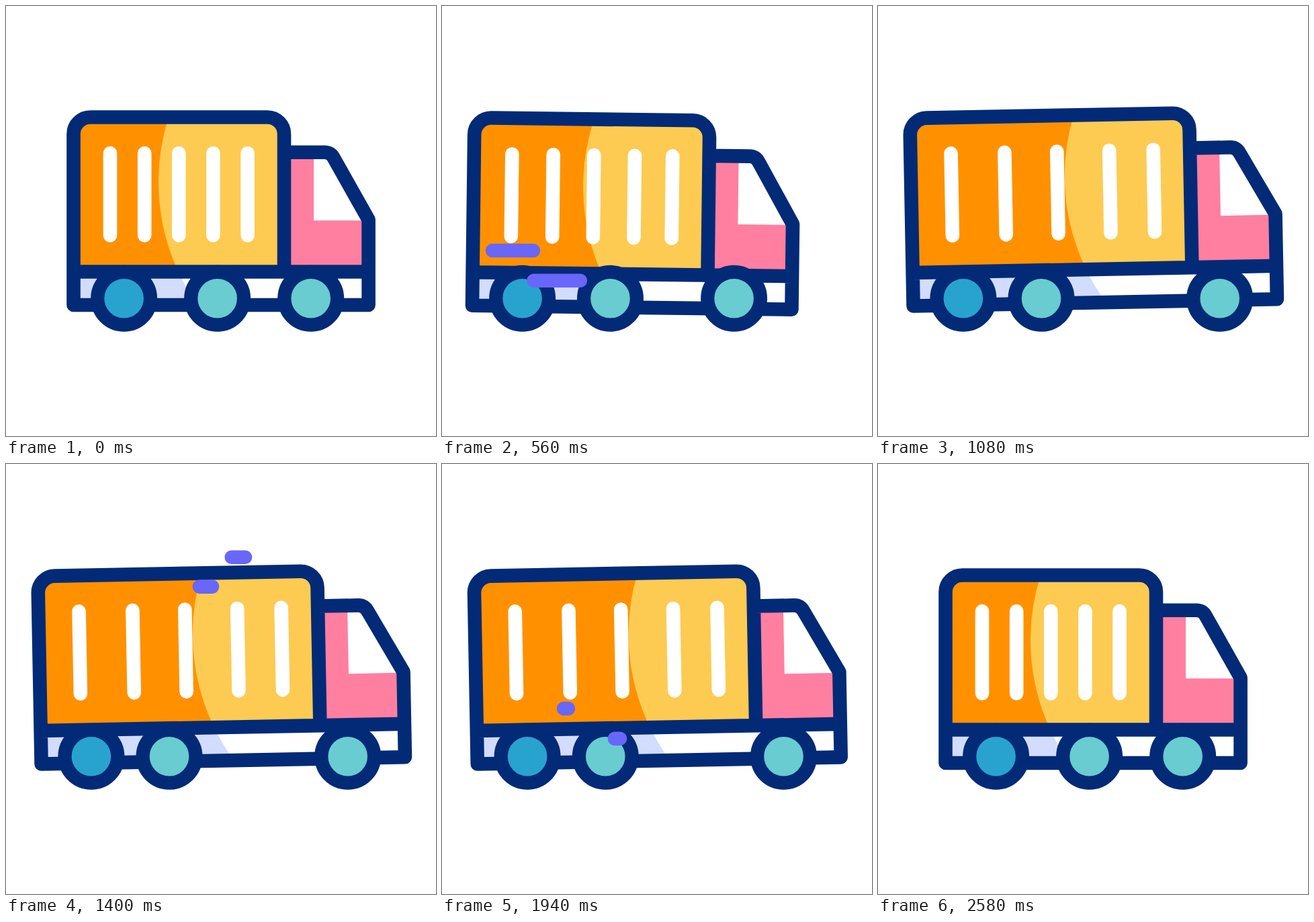
Write an HTML page that moves like this. It is 640x640 px and loops after 3 s.

```html
<!DOCTYPE html>
<html lang="en">
<head>
<meta charset="utf-8">
<title>Delivery truck</title>
<style>
  html, body { margin: 0; width: 100%; height: 100%; overflow: hidden; background: #fff; }
  svg { display: block; width: 100vw; height: 100vh; }
  .line { fill: none; stroke: #032a76; stroke-width: 20.6; stroke-linejoin: round; stroke-linecap: butt; }
  .slot { stroke: #fff; stroke-width: 20.6; stroke-linecap: round; }
  .dash { stroke: #6966fa; stroke-width: 20.6; stroke-linecap: round; }
  .wheel { stroke: #032a76; stroke-width: 20.2; }
</style>
</head>
<body>
<svg viewBox="0 0 640 640">
  <g id="body">
    <path id="load" fill="#fdcb52"/>
    <path id="shade" fill="#ff9100"/>
    <path id="base" fill="#fff"/>
    <path id="baseShade" fill="#d2dcfd"/>
    <g id="cab">
      <path fill="#ff7fa1" d="M414 218H474L488 226.500L539.600 318V395H414Z"/>
      <path fill="#fff" d="M458 218H474Q483.500 218 488 226.500L539.600 319.300H458Z"/>
    </g>
    <g id="slots"></g>
    <path id="outline" class="line"/>
  </g>
  <g id="wheels"></g>
  <g id="dashes"></g>
</svg>
<script>
  const LOOP = 3000;
  const get = id => document.getElementById(id);
  const set = (el, attrs) => { for (const k in attrs) el.setAttribute(k, attrs[k]); };
  const add = (parent, tag, attrs) => {
    const el = document.createElementNS('http://www.w3.org/2000/svg', tag);
    set(el, attrs);
    return parent.appendChild(el);
  };
  const ease = (t, from, to) => {
    const x = Math.min(1, Math.max(0, (t - from) / (to - from)));
    return x * x * (3 - 2 * x);
  };

  // Each pose: body x, body y, tilt, stretch, then the shift of each wheel
  const REST = [0, 0, 0, 0, 0, 0, 0];
  const BACK = [-60, 0, 1.7, 0, -60, -60, -60];
  const AHEAD = [-47.7, 1.7, -1.08, 102.3, -48.7, -71.6, 55];
  const mix = (a, b, k) => a.map((v, i) => v + (b[i] - v) * k);

  function poseAt(t) {
    if (t < 400) return mix(REST, BACK, ease(t, 0, 340));
    if (t < 1900) return mix(BACK, AHEAD, ease(t, 400, 800));
    return mix(AHEAD, REST, ease(t, 1920, 2520));
  }

  const slots = [[155, .056], [206.2, .336], [257.3, .598], [308.4, .86], [359.6, 1]].map(([x, k]) =>
    ({ x, k, el: add(get('slots'), 'line', { class: 'slot', y1: 219, y2: 341.5 }) }));

  const wheels = [[175.6, '#28a3cf'], [314.6, '#68ccd1'], [453.7, '#68ccd1']].map(([x, fill]) =>
    ({ x, el: add(get('wheels'), 'circle', { class: 'wheel', cy: 435.3, r: 39.4, fill }) }));

  // Speed lines grow leftwards from their right end, then follow from the right
  const LOW = [[188, 364, 113], [265, 408.8, 128.5]];
  const HIGH = [[356, 138.7, 113], [307, 182.6, 107]];
  const dashes = [
    [LOW, 180, 510, 400, 740],
    [HIGH, 1305, 1660, 1540, 1900],
    [LOW, 1880, 2280, 2150, 2570]
  ].flatMap(([pair, ...times]) => pair.map(([x, y, len]) =>
    ({ x, len, times, el: add(get('dashes'), 'line', { class: 'dash', y1: y, y2: y }) })));

  const R = 318;
  const edge = y => 545 - Math.sqrt(R * R - (y - 262) ** 2);
  const shadePath = (top, bottom, s) =>
    `M100.500 ${top}H${edge(top) + s}A${R} ${R} 0 0 0 ${edge(bottom) + s} ${bottom}H100.500Z`;
  const boxTop = s => `V190.500a25 25 0 0 1 25-25H${389 + s}a25 25 0 0 1 25 25V395.500`;

  function drawBody(s) {
    set(get('load'), { d: `M100.500 395.500${boxTop(s)}Z` });
    const arc = edge(165.5) + s, end = edge(395.5) + s;
    set(get('shade'), {
      d: `M100.500 395.500V190.500a25 25 0 0 1 25-25H${arc}A${R} ${R} 0 0 0 ${end} 395.500Z`
    });
    set(get('base'), { d: `M100.500 395.500H${539.6 + s}V445H100.500Z` });
    set(get('baseShade'), { d: shadePath(395.5, 445, s) });
    set(get('cab'), { transform: `translate(${s} 0)` });
    set(get('outline'), {
      d: `M${414 + s} 217.800h60q9.500 0 14 8.700L${539.6 + s} 318V445H100.500${boxTop(s)}` +
         `M100.500 395.500H${539.6 + s}`
    });
    for (const { x, k, el } of slots) set(el, { x1: x + s * k, x2: x + s * k });
  }

  function draw(t) {
    const [dx, dy, tilt, stretch, ...shifts] = poseAt(t);
    set(get('body'), { transform: `translate(${dx} ${dy}) rotate(${tilt} 90 455)` });
    drawBody(stretch);
    wheels.forEach(({ x, el }, i) => set(el, { cx: x + shifts[i] }));
    for (const { x, len, times: [a, b, c, d], el } of dashes) {
      const tail = ease(t, a, b), head = ease(t, c, d);
      set(el, {
        x1: x - len * head,
        x2: x - len * tail,
        visibility: tail - head > .002 ? 'visible' : 'hidden'
      });
    }
  }

  const start = performance.now();
  function tick() {
    draw((performance.now() - start) % LOOP);
    requestAnimationFrame(tick);
  }
  draw(0);
  requestAnimationFrame(tick);
</script>
</body>
</html>
```
